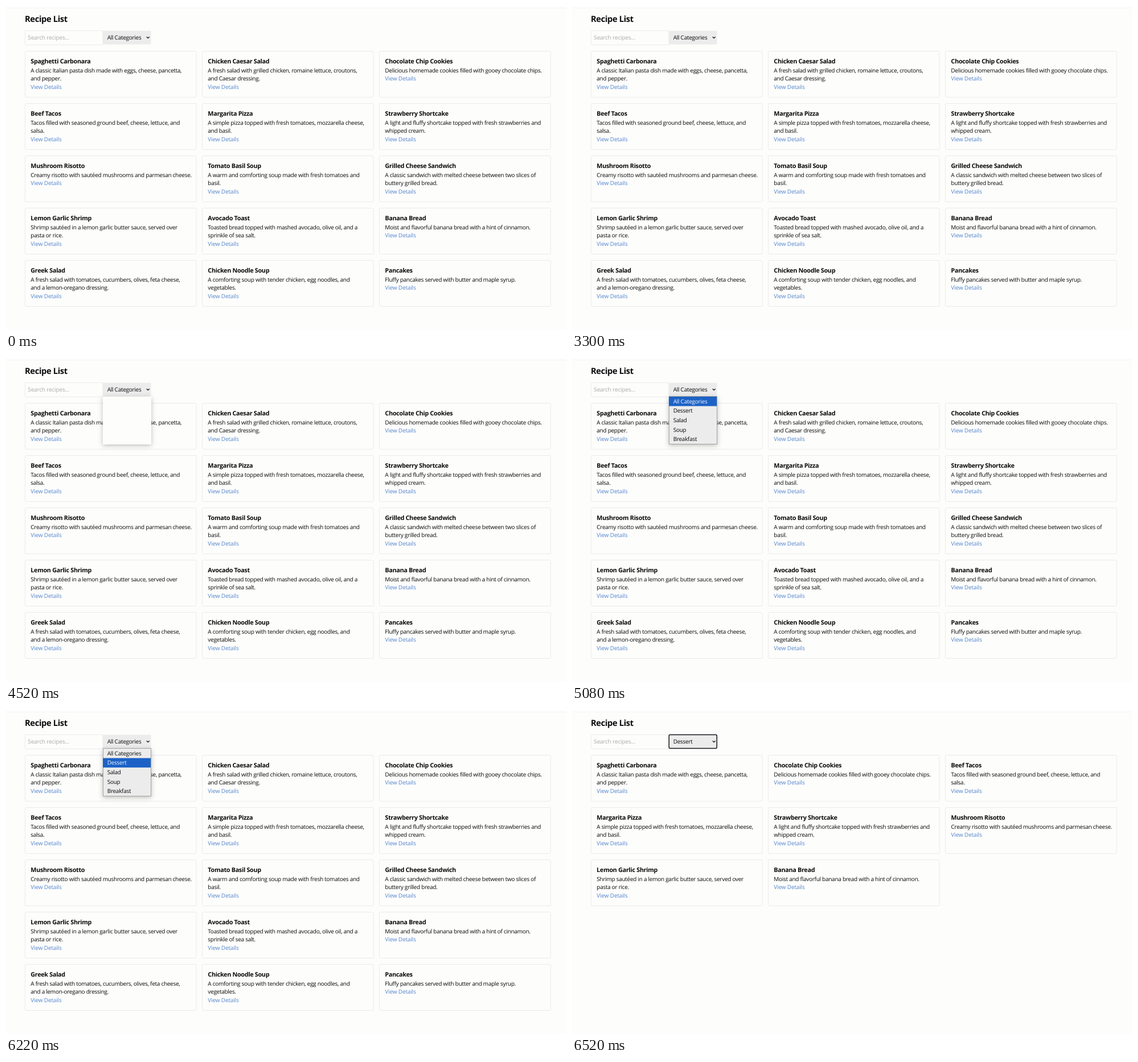
An HTML page that plays this animation: 983 px wide and 570 px high, repeating every 8 s.

```html
<!DOCTYPE html>
<html lang="en">
<head>
<meta charset="utf-8">
<title>Recipe List</title>
<style>
  html, body { margin: 0; width: 100%; height: 100%; overflow: hidden; background: #fdfdfc; }
  svg { display: block; width: 983px; height: 570px; }
  text {
    font: 10px "Open Sans", "Noto Sans", sans-serif;
    letter-spacing: -0.27px;
    fill: #0a0a0a;
    text-rendering: geometricPrecision;
  }
  .head { font-size: 14.8px; font-weight: 700; letter-spacing: -0.4px; fill: #0c0c0c; }
  .name { font-size: 10.8px; font-weight: 700; letter-spacing: -0.3px; fill: #0c0c0c; }
  .link { fill: #5585cc; letter-spacing: -0.15px; }
  .hint { fill: #a9a9a9; letter-spacing: -0.15px; }
  .box { fill: #fdfdfc; stroke: #ebebee; }
</style>
</head>
<body>
<svg id="stage" viewBox="0 0 983 570">
  <defs>
    <filter id="shadow" x="-30%" y="-30%" width="160%" height="160%">
      <feDropShadow dx="0" dy="2" stdDeviation="4" flood-color="#000" flood-opacity=".25"/>
    </filter>
  </defs>
  <rect width="983" height="570" fill="#fdfdfc"/>
  <rect y="3" width="983" height="1" fill="#f3f3f5"/>
  <text class="head" x="33" y="28">Recipe List</text>
  <rect class="box" x="33.5" y="43.5" width="137" height="25" rx="2"/>
  <text class="hint" x="38.3" y="59">Search recipes...</text>
  <g id="cards"></g>
  <rect id="select" x="169.5" y="43.5" width="85" height="24" rx="2" fill="#ececec"/>
  <text id="value" x="177.7" y="59"></text>
  <path d="M246.8 54.3l2.4 2.4 2.4-2.4" fill="none" stroke="#111" stroke-width="1.3"/>
  <g id="menu">
    <rect id="sheet" x="170" y="68" width="85" height="84" filter="url(#shadow)"/>
    <g id="options">
      <rect x="170.5" y="67.5" width="84" height="84" fill="none" stroke="#a2a2a2"/>
      <rect id="mark" x="170" width="84" height="16.6" fill="#1c62c6"/>
    </g>
  </g>
</svg>
<script>
const LOOP = 8000;
const OPEN = 4520, FILL = 4560, HOVER = 5540, PICK = 6480, FILTER = 6520;
const categories = ["All Categories", "Dessert", "Salad", "Soup", "Breakfast"];

// name, description lines, stays in the filtered list
const recipes = [
  ["Spaghetti Carbonara", ["A classic Italian pasta dish made with eggs, cheese, pancetta,", "and pepper."], true],
  ["Chicken Caesar Salad", ["A fresh salad with grilled chicken, romaine lettuce, croutons,", "and Caesar dressing."]],
  ["Chocolate Chip Cookies", ["Delicious homemade cookies filled with gooey chocolate chips."], true],
  ["Beef Tacos", ["Tacos filled with seasoned ground beef, cheese, lettuce, and", "salsa."], true],
  ["Margarita Pizza", ["A simple pizza topped with fresh tomatoes, mozzarella cheese,", "and basil."], true],
  ["Strawberry Shortcake", ["A light and fluffy shortcake topped with fresh strawberries and", "whipped cream."], true],
  ["Mushroom Risotto", ["Creamy risotto with sautéed mushrooms and parmesan cheese."], true],
  ["Tomato Basil Soup", ["A warm and comforting soup made with fresh tomatoes and", "basil."]],
  ["Grilled Cheese Sandwich", ["A classic sandwich with melted cheese between two slices of", "buttery grilled bread."]],
  ["Lemon Garlic Shrimp", ["Shrimp sautéed in a lemon garlic butter sauce, served over", "pasta or rice."], true],
  ["Avocado Toast", ["Toasted bread topped with mashed avocado, olive oil, and a", "sprinkle of sea salt."]],
  ["Banana Bread", ["Moist and flavorful banana bread with a hint of cinnamon."], true],
  ["Greek Salad", ["A fresh salad with tomatoes, cucumbers, olives, feta cheese,", "and a lemon-oregano dressing."]],
  ["Chicken Noodle Soup", ["A comforting soup with tender chicken, egg noodles, and", "vegetables."]],
  ["Pancakes", ["Fluffy pancakes served with butter and maple syrup."]]
];

const $ = id => document.getElementById(id);

function add(parent, tag, attrs, text) {
  const el = document.createElementNS("http://www.w3.org/2000/svg", tag);
  for (const k in attrs) el.setAttribute(k, attrs[k]);
  if (text) el.textContent = text;
  return parent.appendChild(el);
}

function show(el, on) {
  el.setAttribute("display", on ? "inline" : "none");
}

const cards = recipes.map(([name, lines, keep]) => {
  const el = add($("cards"), "g", {});
  add(el, "rect", { class: "box", x: .5, y: .5, width: 300.5, height: 81, rx: 2 });
  add(el, "text", { class: "name", x: 10.3, y: 22.2 }, name);
  [...lines, "View Details"].forEach((line, i) => {
    const type = i === lines.length ? "link" : "body";
    add(el, "text", { class: type, x: 10.3, y: 37.7 + i * 14.7 }, line);
  });
  return { el, keep };
});

const options = categories.map((label, i) =>
  add($("options"), "text", { x: 177.7, y: 79.8 + i * 16.6 }, label));

function layout(filtered) {
  let n = 0;
  for (const { el, keep } of cards) {
    const on = !filtered || keep;
    show(el, on);
    if (!on) continue;
    const x = 33 + n % 3 * 311, y = Math.round(78.7 + Math.floor(n / 3) * 92.1);
    el.setAttribute("transform", `translate(${x} ${y})`);
    n++;
  }
}

function draw(t) {
  const picked = t >= PICK;
  const filled = t >= FILL;
  const active = t >= HOVER ? 1 : 0;
  layout(t >= FILTER);

  $("value").textContent = categories[picked ? 1 : 0];
  const box = $("select");
  box.setAttribute("stroke", picked ? "#15151c" : "none");
  box.setAttribute("stroke-width", 1.5);
  box.setAttribute("x", picked ? 170.3 : 169.5);
  box.setAttribute("width", picked ? 84 : 85);

  show($("menu"), t >= OPEN && !picked);
  show($("options"), filled);
  $("sheet").setAttribute("fill", filled ? "#ececec" : "#fdfdfc");
  $("mark").setAttribute("y", 68 + active * 16.6);
  options.forEach((el, i) => { el.style.fill = i === active ? "#f4f7fc" : "#0a0a0a"; });
}

const start = performance.now();
function tick() {
  draw((performance.now() - start) % LOOP);
  requestAnimationFrame(tick);
}
draw(0);
requestAnimationFrame(tick);
</script>
</body>
</html>
```
